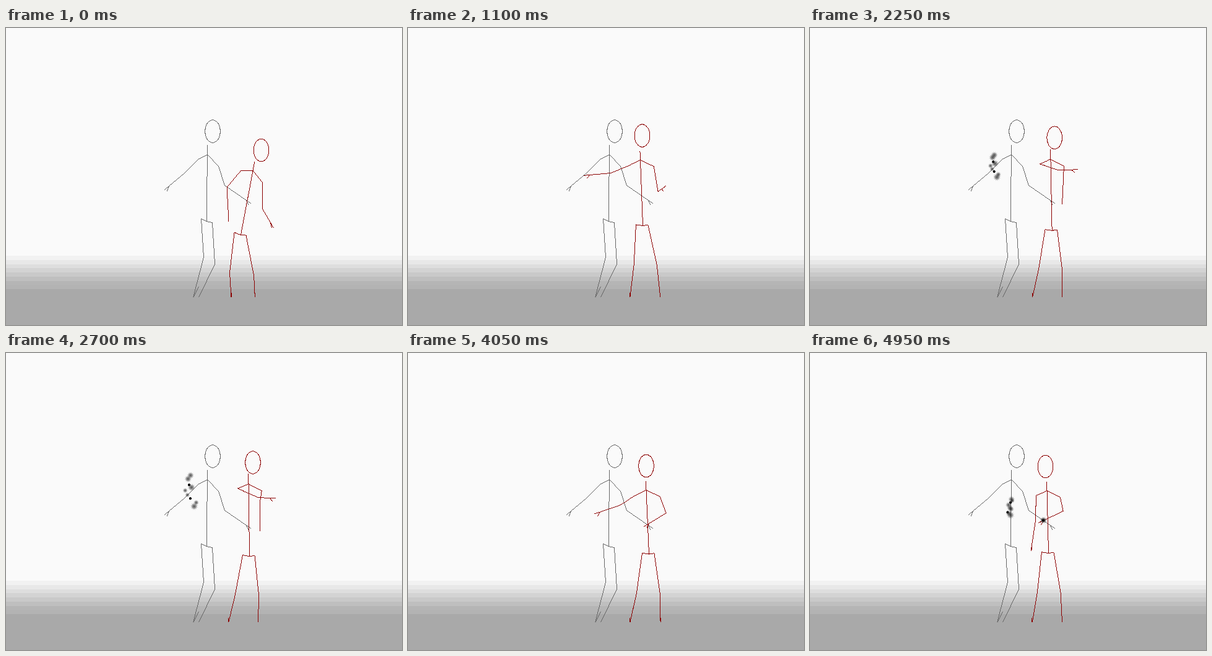
An HTML page with a canvas that plays this animation: 640x480 px, repeating every 5000 ms.

```html
<!DOCTYPE html>
<html lang="en">
<head>
<meta charset="utf-8">
<title>Two stick figures</title>
<style>
html, body { margin: 0; width: 100%; height: 100%; overflow: hidden; background: #fafafa; }
canvas { display: block; }
</style>
</head>
<body>
<canvas id="stage" width="640" height="480"></canvas>
<script>
const ctx = document.getElementById("stage").getContext("2d");
const LOOP = 5000, STEP = 50, GROUND = 435;

// Key poses; everything else on the moving figure follows from these joints.
const poses = [
  { at: 0, head: [412, 197], chest: [398.5, 230], hip: [379, 334],
    elbows: [356.5, 257, 413.5, 291], hands: [359, 303, 427, 314] },
  { at: 1100, head: [378, 173.5], chest: [375, 213], hip: [379, 319],
    elbows: [327, 234, 403.5, 264], hands: [293, 237, 409, 260] },
  { at: 1850, head: [385, 177.5], chest: [380.5, 213], hip: [384.5, 324],
    elbows: [385, 219.5, 406, 262], hands: [414, 214.5, 401, 266] },
  { at: 2700, head: [398.5, 176.5], chest: [391.5, 211], hip: [393, 328],
    elbows: [407, 233, 410, 240], hands: [426, 234, 410, 278] },
  { at: 3350, head: [396, 180.5], chest: [389.5, 219], hip: [392.5, 325],
    elbows: [370, 248, 413, 251], hands: [389, 253, 400, 275] },
  { at: 4050, head: [384.5, 182], chest: [384.5, 221], hip: [389, 324.5],
    elbows: [341, 246, 416.5, 258], hands: [310, 256.5, 389, 275] },
  { at: 4950, head: [380, 183], chest: [382.5, 222], hip: [385, 323],
    elbows: [364, 270, 408.5, 255], hands: [358, 310, 377, 270] }
];

const standing = {
  head: [333.5, 166.5], chest: [325, 204], hip: [323.5, 312],
  elbows: [288, 234, 353, 254], hands: [263, 255, 388, 278],
  shoulders: [[310, 212], [343, 223]],
  legs: [[[315, 308], [319, 370], [302, 435], [311, 418]],
         [[333, 314], [337, 381], [311, 435]]]
};

const hits = [
  { x: 297, y: 224, start: 1125, end: 3700, seed: 3 },
  { x: 325, y: 250, start: 4150, end: LOOP, seed: 21 },
  { x: 377, y: 271, start: 4900, end: LOOP, seed: 40 }
];

const mix = (a, b, k) => a.map((v, i) => v + (b[i] - v) * k);
const easeOut = k => k * (2 - k);
const add = ([x, y], [dx, dy]) => [x + dx, y + dy];
const turn = ([x, y], a) =>
  [x * Math.cos(a) - y * Math.sin(a), x * Math.sin(a) + y * Math.cos(a)];
const random = n => { const v = Math.sin(n * 12.9898) * 43758.5453; return v - Math.floor(v); };

// Hard-edged line, one pixel wide.
function line(...points) {
  for (let i = 1; i < points.length; i++) {
    const a = points[i - 1], b = points[i];
    const n = Math.ceil(Math.max(Math.abs(b[0] - a[0]), Math.abs(b[1] - a[1]))) || 1;
    for (let j = 0; j <= n; j++) {
      const [x, y] = mix(a, b, j / n).map(Math.round);
      if (y < GROUND) ctx.fillRect(x, y, 1, 1);
    }
  }
}

function poseAt(time) {
  const next = poses.findIndex(p => p.at > time);
  if (next < 0) return poses[poses.length - 1];
  const a = poses[next - 1], b = poses[next];
  const k = easeOut((time - a.at) / (b.at - a.at));
  const pose = {};
  for (const joint of ["head", "chest", "hip", "elbows", "hands"])
    pose[joint] = mix(a[joint], b[joint], k);
  return pose;
}

// Shoulders and hips turn with the spine; the feet stay near their spots.
function addLimbs(pose) {
  const { chest, hip } = pose;
  const tilt = Math.atan2(chest[0] - hip[0], hip[1] - chest[1]);
  const leg = (socket, footX, bend) => {
    const top = add(hip, turn(socket, tilt)), foot = [footX, 437];
    const knee = mix(top, foot, 65 / (foot[1] - top[1]));
    return [top, add(knee, [bend, 0]), foot, add(foot, [0, -9])];
  };
  return {
    ...pose,
    shoulders: [[-18, 7], [21, 12]].map(s => add(chest, turn(s, 2 * tilt))),
    legs: [leg([-11, -2], 359 + 25 * tilt, 1 - 30 * tilt),
           leg([8.5, -1], 406.5 - 25 * tilt, 3.5)]
  };
}

function figure({ head, chest, hip, elbows, hands, shoulders, legs }, color) {
  ctx.fillStyle = color;
  line(...Array.from({ length: 49 }, (_, i) =>
    add(head, [12.3 * Math.cos(i * Math.PI / 24), 18.3 * Math.sin(i * Math.PI / 24)])));
  line(mix(hip, chest, 1.135), hip);
  shoulders.forEach((shoulder, side) => {
    const elbow = elbows.slice(side * 2, side * 2 + 2);
    const hand = hands.slice(side * 2, side * 2 + 2);
    const angle = Math.atan2(hand[1] - elbow[1], hand[0] - elbow[0]);
    const [dx, dy] = turn([1, 0], angle);
    line(chest, shoulder, elbow, hand, add(hand, [9 * dx, 9 * dy]));
    line(hand, add(hand, [4 * dx, 4 * dy + 5]));
  });
  legs.forEach(leg => line(hip, ...leg));
}

function spark(x, y, r, spikes) {
  const glow = ctx.createRadialGradient(x, y, 0, x, y, r);
  glow.addColorStop(0, spikes ? "rgba(20,20,20,.75)" : "#000");
  glow.addColorStop(spikes ? 0.45 : 0.7, spikes ? "rgba(50,50,50,.45)" : "#000");
  glow.addColorStop(1, "rgba(90,90,90,0)");
  ctx.fillStyle = glow;
  ctx.beginPath();
  for (let i = 0; i < 24; i++) {
    const reach = spikes && i % 2 ? r * 0.5 : r, a = i * Math.PI / 12 + 0.3;
    ctx.lineTo(x + reach * Math.cos(a), y + reach * Math.sin(a));
  }
  ctx.fill();
}

// Sparks leave a hit one after another and drift apart, mostly up and down.
function burst({ x, y, start, end, seed }, time) {
  if (time < start || time >= end) return;
  const age = time - start;
  for (let i = 0; i < Math.min(9, age / 20); i++) {
    const vx = (random(seed + i) - 0.5) * 0.014;
    const vy = ((i + random(seed + i + 50)) / 9 - 0.5) * 0.038;
    const dot = i % 4 === 2;
    spark(x + vx * age, y + vy * age, dot ? 2.5 : 4.5 + 3 * random(seed + i + 90), !dot);
  }
}

function floor() {
  for (let i = 0; i <= 8; i++) {
    const shade = i < 8 ? Math.max(179, Math.round(242 - 10.2 * i)) : 169;
    ctx.fillStyle = `rgb(${shade},${shade},${shade})`;
    ctx.fillRect(0, Math.round(368 + 6.75 * i), 640, 112);
  }
}

const begin = performance.now();
function draw() {
  const time = Math.floor((performance.now() - begin) % LOOP / STEP) * STEP;
  ctx.fillStyle = "#fafafa";
  ctx.fillRect(0, 0, 640, 480);
  floor();
  figure(standing, "#666");
  figure(addLimbs(poseAt(time)), "#8b0000");
  hits.forEach(hit => burst(hit, time));
  requestAnimationFrame(draw);
}
draw();
</script>
</body>
</html>
```
